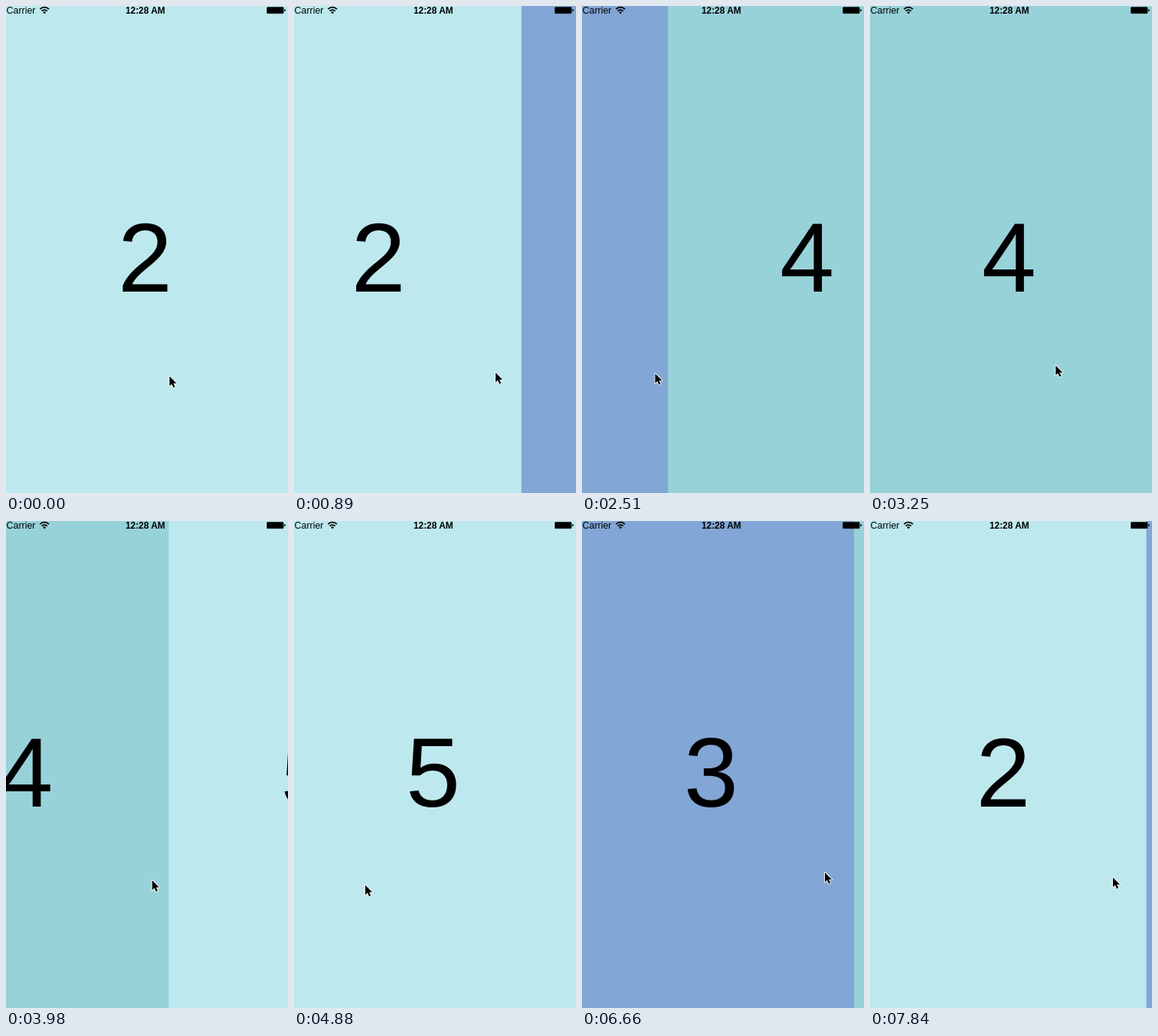
Write an HTML page that moves like this. It is 368x636 px and loops after 7990 ms.

```html
<!DOCTYPE html>
<html lang="en">
<head>
<meta charset="utf-8">
<title>Swiping pages</title>
<style>
  html, body { margin: 0; width: 100%; height: 100%; overflow: hidden; background: #bde9ee; }
  svg { display: block; width: 100%; height: 100%; }
  text { font-family: "Liberation Sans", Arial, sans-serif; }
  .digit { font-size: 127.5px; text-anchor: middle; }
  .time { font-size: 11.9px; font-weight: bold; text-anchor: middle; }
  .carrier { font-size: 12.4px; }
</style>
</head>
<body>
<svg viewBox="0 0 368 636">
  <g id="pages"></g>

  <g id="status">
    <text class="carrier" x="0.6" y="10">Carrier</text>
    <g fill="none" stroke="#000" stroke-width="1.7">
      <path d="M44.4 4.2A8 8 0 0 1 56 4.2"/>
      <path d="M46.6 6.6A5 5 0 0 1 53.8 6.6"/>
    </g>
    <path d="M48.2 8.2A2.8 2.8 0 0 1 52.2 8.2L50.2 10.2Z"/>
    <text class="time" x="181.8" y="10">12:28 AM</text>
    <rect x="340.5" y="1.5" width="21.6" height="8.2" rx="1" stroke="#000" stroke-opacity=".5"/>
    <path d="M363.2 4Q365 4.2 365 5.6T363.2 7.2Z"/>
  </g>

  <g id="cursor">
    <g transform="scale(.9)">
      <path id="arrow" d="M0 0V14.2L3.2 11.2L5.6 16.4L8 15.4L5.7 10.3H10.2Z"
            stroke="#fff" stroke-width="2" stroke-linejoin="round" paint-order="stroke"/>
    </g>
  </g>
</svg>

<script>
const LOOP = 7990, FRAMES = 54, TICK = LOOP / FRAMES, WIDTH = 368;
const FIRST_PAGE = 2;
const COLORS = ['#bde9ee', '#82a6d5', '#98d2d9', '#bde9ee'];

// The hand strokes right, left, right... starting at these times.
// Left strokes turn pages forward until TURN, right strokes turn them back after it.
const STROKES = [-210, 760, 1640, 2140, 3010, 3630, 4925, 5575, 6075, 6725, 7225];
const TURN = 4500, STROKE_TIME = 400;
const LEFT = 93, RIGHT = 317;

// A page follows the hand for part of its width, then glides to rest.
const DRAG = 330, GLIDE = 450, DRAGGED = 0.58;

const pages = document.getElementById('pages');
const cursor = document.getElementById('cursor');

pages.innerHTML = COLORS.map((color, i) => `
  <g transform="translate(${i * WIDTH})">
    <rect width="${WIDTH + 0.5}" height="636" fill="${color}"/>
    <text class="digit" x="181.4" y="373.2">${FIRST_PAGE + i}</text>
  </g>`).join('');

const clamp = v => Math.min(1, Math.max(0, v));
const smooth = v => v * v * (3 - 2 * v);
const direction = i => i % 2 ? -1 : 1;
const sumStrokes = fn => STROKES.reduce((sum, start, i) => sum + fn(start, direction(i)), 0);

function swipeProgress(elapsed) {
  if (elapsed < DRAG) return DRAGGED * smooth(clamp(elapsed / DRAG));
  return 1 - (1 - DRAGGED) * (1 - clamp((elapsed - DRAG) / GLIDE)) ** 3;
}

const scrollAt = t => sumStrokes((start, dir) => {
  const turnsPage = (start < TURN) === (dir < 0);
  return turnsPage && start > 0 ? -dir * swipeProgress(t - start) : 0;
});

function pointerAt(t) {
  const swing = sumStrokes((start, dir) => dir * smooth(clamp((t - start) / STROKE_TIME)));
  const sway = 6 * Math.cos(2 * Math.PI * (t - 4884) / 2900);
  return [LEFT + (RIGHT - LEFT) * swing, 486 - 27 * t / LOOP + sway];
}

const start = performance.now();

function render() {
  const now = (performance.now() - start) % LOOP;
  const t = Math.min(FRAMES - 1, Math.floor((now + 12) / TICK)) * TICK;
  pages.setAttribute('transform', `translate(${-scrollAt(t) * WIDTH})`);
  cursor.setAttribute('transform', `translate(${pointerAt(t)})`);
  requestAnimationFrame(render);
}
render();
</script>
</body>
</html>
```
